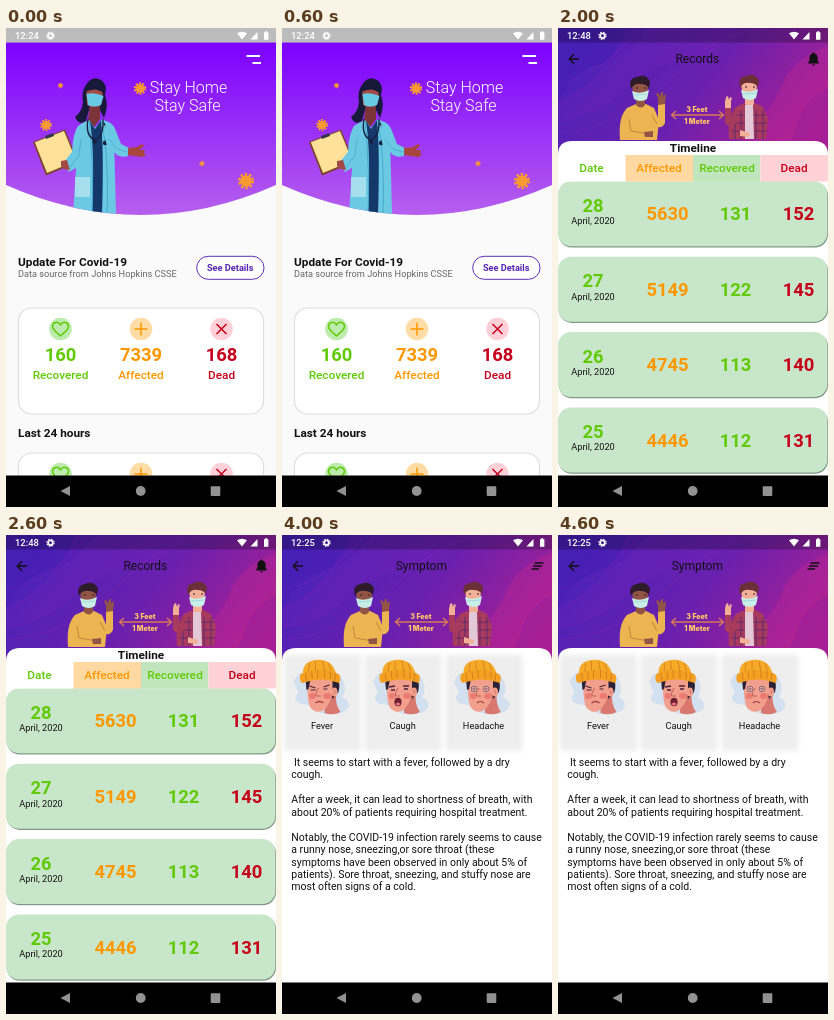
Write an HTML page that moves like this. It is 270 by 479 pixels and loops after 5000 ms.

```html
<!DOCTYPE html>
<html lang="en">
<head>
<meta charset="utf-8">
<style>
html, body { margin: 0; width: 100%; height: 100%; overflow: hidden; background: #fafafa; }
svg { display: block; width: 100vw; height: 100vh; }
text { font-family: Roboto, Inter, sans-serif; white-space: pre; }
</style>
</head>
<body>
<svg id="stage" viewBox="0 0 270 479" xmlns="http://www.w3.org/2000/svg"></svg>
<script>
const GREEN = '#60ca08', ORANGE = '#ff9800', RED = '#c6001c', DARK = '#111';

// Drawing helpers
const path = (d, fill, extra = '') => `<path d="${d}" fill="${fill}" ${extra}/>`;
const line = (d, color, w = 1, extra = '') =>
  `<path d="${d}" fill="none" stroke="${color}" stroke-width="${w}" ${extra}/>`;
const rect = (x, y, w, h, fill, r = 0, extra = '') =>
  `<rect x="${x}" y="${y}" width="${w}" height="${h}" rx="${r}" fill="${fill}" ${extra}/>`;
const dot = (x, y, r, fill, extra = '') => `<circle cx="${x}" cy="${y}" r="${r}" fill="${fill}" ${extra}/>`;
const oval = (x, y, rx, ry, fill) => `<ellipse cx="${x}" cy="${y}" rx="${rx}" ry="${ry}" fill="${fill}"/>`;
const at = (x, y, body, scale = 1) => `<g transform="translate(${x} ${y}) scale(${scale})">${body}</g>`;
const text = (s, x, y, size, o = {}) =>
  `<text x="${x}" y="${y}" font-size="${size}" font-weight="${o.w || 400}" fill="${o.c || DARK}" ` +
  `text-anchor="${o.a || 'start'}" ${o.extra || ''}>${s}</text>`;
const mid = (s, x, y, size, c = DARK, w = 400) => text(s, x, y, size, { c, w, a: 'middle' });

// System chrome
function statusBar(time) {
  const gx = time.length > 4 ? 44.5 : 39;
  return rect(0, 0, 270, 14.5, '#000', 0, 'opacity=".25"') +
    text(time, 9, 11, 9.4, { c: '#fff', w: 500 }) +
    dot(gx, 7.8, 2.3, 'none', 'stroke="#fff" stroke-width="1.7"') +
    dot(gx, 7.8, 3.6, 'none', 'stroke="#fff" stroke-width="1.1" stroke-dasharray="1.6 1.23"') +
    path('M231 5.3Q236 2 241 5.3L236 11.6Z', '#fff') +
    path('M244.5 11.6L251.5 4V11.6Z', '#fff') +
    path('M258 4.2H259.2V3.2H261.2V4.2H262.4V11.8H258Z', '#fff');
}

const navBar = rect(0, 447.5, 270, 32, '#000') +
  path('M54.5 463L64 458V468Z', '#929292') + dot(134.7, 463, 4.9, '#929292') +
  rect(204.7, 458.3, 9.6, 9.6, '#929292', .8);

// Statistics
const icons = {
  heart: line('M0 6.8C-5 2.8-8 .3-8-2.6C-8-7.2-2.3-8 0-4.2C2.3-8 8-7.2 8-2.6C8 .3 5 2.8 0 6.8Z', GREEN, 1.5),
  plus: line('M-6.5 0H6.5M0-6.5V6.5', ORANGE, 1.5),
  cross: line('M-5-5L5 5M5-5L-5 5', RED, 1.5)
};

function stats(y, recovered, affected, dead) {
  const cols = [
    [54.5, '#bdebae', 'heart', recovered, 'Recovered', GREEN],
    [135, '#ffdca6', 'plus', affected, 'Affected', ORANGE],
    [215.5, '#ffd0d7', 'cross', dead, 'Dead', RED]
  ];
  return rect(12.5, y, 245, 106, '#fff', 13, 'stroke="#dedede" stroke-width="1.2"') +
    cols.map(([x, tint, icon, n, label, c]) =>
      at(x, y + 21, dot(0, 0, 11.3, tint) + icons[icon]) +
      mid(n, x, y + 53, 18.4, c, 700) + mid(label, x, y + 71.4, 11.8, c, 500)).join('');
}

const heading = (s, y) => text(s, 12, y, 11.8, { w: 700 });
const button = y => rect(190.7, y, 67.3, 23, '#fff', 11.5, 'stroke="#5b30b5" stroke-width="1"') +
  mid('See Details', 224.2, y + 14.8, 9.2, '#5424b0', 700);
const tile = (x, y, w, h) => rect(x - 3, y - 2, w + 7, h + 6, '#eee', 3, 'filter="url(#soft)"');

// Home banner
const virus = (x, y, r) => at(x, y,
  dot(0, 0, r * .88, 'none', `stroke="#f79a32" stroke-width="${r * .5}" stroke-dasharray="${r * .32} ${r * .233}"`) +
  dot(0, 0, r * .78, '#f79a32'));

const doctor =
  path('M80 57Q86 47 95 52Q102 56 99 67Q103 78 98 90L92 78H84L80 93Q73 98 69 89Q76 84 77 74Q75 63 80 57Z', '#16193a') +
  path('M84 74H94V91L88 99L82 93Z', '#7c3438') +
  path('M80 60Q89 52 97 62L96 75Q89 82 81 77Z', '#a34a45') +
  path('M79 64Q80 50 91 53Q99 56 98 66Q91 58 79 64Z', '#16193a') +
  path('M80.5 66Q89 64 97.5 68L95 77Q88 80 82 77Z', '#68cbe6') +
  path('M72 98Q78 94 83 92L89 100L96 91Q105 94 108 107L110 187H67L70 140Q68 115 72 98Z', '#6cc9e4') +
  path('M84 93L89 101L95 92Q98 120 96 187H86Q89 125 84 93Z', '#14386a') +
  rect(69, 149, 15, 20, '#a6e0ef', 1) +
  line('M83 93Q88 140 86 187M95 92Q103 125 101 187', '#46a9cd', 1) +
  line('M82 91Q79 108 89 112Q98 108 97 91M98 95Q104 104 100 113', '#17213f', 1.4) +
  dot(89, 114, 2, '#17213f') + dot(99, 115, 2.2, '#17213f') +
  path('M99 93Q107 94 110 103L115 116L123 120L122 128Q116 130 111 127L100 115Z', '#6cc9e4') +
  line('M103 111L111 121L121 124', '#46a9cd', .8) +
  path('M122 120L131 119L136 116L138 118L133 122L139 122L138 125L140 127L136 129L122 127Z', '#a8453c') +
  path('M27 114L59 101.5L72 134L40 147.5Z', '#7a4326') +
  path('M28.8 114.3L58 103L70.3 132.8L41 145Z', '#ffe19a') +
  path('M39 108L47 105L48 108L40 111Z', '#34344f') +
  path('M72 98Q67 105 66 124L57 135L63 144Q75 138 78 128L80 108Z', '#6cc9e4') +
  line('M75 111L73 127L64 139', '#46a9cd', .8) +
  path('M55 133L61 132L64 142L58 141L55 138Z', '#a34a45');

const banner = path('M0 14.5H270V157Q135 217 0 157Z', 'url(#home)') +
  `<g clip-path="url(#curve)">${doctor}</g>` +
  virus(134, 60.5, 5.5) + virus(54.5, 57.5, 2.4) + virus(40, 97, 5.2) +
  virus(196, 135.5, 2.4) + virus(240, 153, 7.2) +
  line('M240.5 28H254M246.5 35H255', '#fff', 1.8) +
  mid('Stay Home', 182.5, 65, 16, '#fff', 300) + mid('Stay Safe', 181.5, 82.5, 16, '#fff', 300);

// Symptom portraits, centred on the origin
const moods = {
  fever: line('M-11-1L-5 1M3 0L9-2M-10 3H-5M3 2H7', '#46243a', 1.2) +
    line('M-5 16Q-1 13 3 16', '#a33c42', 1.3),
  cough: line('M-11 0L-5-1M3-1L9-1M-9 3L-5 3M4 2L8 2', '#46243a', 1.3) +
    oval(-2, 15, 3.6, 4.2, '#6e2132') + path('M-4.5 17Q-2 14 .5 17Q-2 20-4.5 17Z', '#ef7780'),
  headache: [-7, 5].map(x => dot(x, 2, 3.8, '#f7c1b0') +
    dot(x, 2, 3, 'none', 'stroke="#704155" stroke-width=".8"') +
    dot(x, 2, 1.2, 'none', 'stroke="#704155" stroke-width=".8"')).join('') +
    line('M-4 16Q-1 13 3 16', '#8e343e', 1.2)
};

const portrait = mood =>
  path('M-27-5Q-23-18-8-15Q14-21 22-8Q27 2 22 10Q33 16 25 24Q9 31-4 24Q-9 17-20 17Q-29 12-22 5Z', '#d3e0f0') +
  path('M4 13L16 5Q14 17 20 25Q13 29 4 26Z', '#d9786e') +
  path('M8-10Q22-10 18 5L12 12Z', '#2b2136') +
  path('M-13-9H12V7Q9 19 2 24Q-6 27-11 19Q-14 9-13-9Z', '#f2a08d') +
  path('M-15-8H-10L-12 2L-14 3Z', '#2b2136') +
  oval(14, 5, 3, 4.5, '#f2a08d') + line('M13 3Q16 4 14 7', '#c8685f', .8) +
  oval(-8, 9, 3.5, 3, '#ea7c74') + oval(7, 9, 4, 3, '#ea7c74') +
  line('M-2 1Q-6 8-4 9H0', '#bd5b57', 1) + moods[mood] +
  path('M-17-10Q-20-25-5-27Q12-29 16-12Z', '#f7a928') +
  line('M-11-24L-12-15M-5-26V-15M2-26L4-15M8-24L11-14', '#d98620', 1) +
  path('M-20-13Q0-21 18-13Q21-11 19-4Q0-11-18-4Q-22-6-20-13Z', '#f4a023') +
  line('M-15-14L-14-6M-9-16L-8-8M-3-17V-9M4-17V-9M10-15V-8M15-14L14-6', '#cf7e1e', .9);

// Prevention pictures, centred on the origin
const badge = (x, y, ok) => dot(x, y, 6.7, '#fff') +
  (ok ? line(`M${x - 2.6} ${y - 2.5}L${x - .3} ${y + 2.6}L${x + 2.6} ${y - 2.8}`, '#18b7ae', 1.3)
      : line(`M${x - 3} ${y - 3}l6 6m0-6l-6 6`, '#e94b55', 1.2));

const foam = [[-15, -8, 6], [-9, -14, 6], [-1, -15, 5], [6, -13, 6], [13, -8, 5], [17, -1, 4], [-19, 0, 3], [10, -1, 7]];
const pictures = {
  wash: foam.map(([x, y, r]) => dot(x, y, r, '#27b5b4')).join('') +
    path('M-25 12Q-17 1-6-6L4-12Q8-11 5-7L-2 0L14-8Q18-7 15-3L4 6L16 1Q19 3 15 7L-3 19Q-15 25-19 19Z', '#f7b59d') +
    path('M-18 1Q-16-9-6-13Q1-13 0-8L-7-1Q-11 9-18 11Z', '#ffc8b1') +
    path('M2 24Q15 21 23 8L20-3Q13 2 10 8L-2 14Z', '#ef9f8a') +
    line('M-2 0L-10 8M4 6L-6 13M15 7L3 13', '#d98473', .8) +
    dot(-11, -8, 3, '#7adbd5') + dot(3, -11, 2.3, '#7adbd5') + dot(12, 2, 3, '#7adbd5'),
  mask: path('M-14 18Q-19-8-10-20Q3-29 13-17Q18-4 18 13Q23 17 17 23H-13Z', '#4a2033') +
    path('M-19 24Q-14 12 0 12Q16 12 21 23Q3 33-19 24Z', '#e7405e') +
    path('M-3 8H7V16Q2 20-3 16Z', '#ee9f8f') +
    path('M-9-10Q2-21 12-8V3Q8 14 1 14Q-8 11-9 0Z', '#ffc1aa') +
    path('M-11-8Q-7-22 4-20Q14-17 13-5Q6-7 3-14Q-1-7-11-8Z', '#4a2033') +
    line('M-6-4L-2-4M5-4L9-4', '#4a2033', 1.2) +
    path('M-9 1Q2-2 12 1Q12 12 2 15Q-8 12-9 1Z', '#27b5b4') + line('M-6 5H9M-5 9H8', '#128e96', .7) +
    path('M-24 17L-23-2Q-25-10-22-11L-20-4L-19-12L-17-4L-15-10L-14 0L-13 16Z', '#27b5b4'),
  sneeze: path('M-20 18Q-24 8-17 0Q-17-20-2-23Q14-23 15-6Q16 2 12 10L8 20H-14Z', '#482034') +
    path('M-25 23Q-20 11-5 12Q12 13 20 21L19 25Q-4 32-25 23Z', '#e7405e') +
    path('M-6 7H5V15Q0 19-6 15Z', '#e78f82') +
    path('M-9-9Q1-19 12-8L13 2Q9 13 1 13Q-8 10-9 0Z', '#ffbca7') +
    path('M-12-4Q-9-21 4-19Q14-16 13-5Q7-7 5-13Q0-5-12-4Z', '#482034') +
    line('M-4-4L0-2M6-2L10-4', '#482034', 1.2) + oval(4, 7, 3, 2.5, '#7a2038') +
    path('M17 25L8 17L5 9Q8 4 11 7L16 10L22 18Z', '#f5a28f') +
    line('M17 3L23-1M18 6L25 5M17 9L23 11', '#5cb8cc', 1.2)
};
const picture = (kind, x, y) => dot(x, y, 27.5, '#fff') + at(x, y, pictures[kind]) +
  badge(x + 20, y - 19.5, kind !== 'sneeze');

// Shared banner of the detail pages
const person = (skin, hair, shirt) =>
  path('M-20 49Q-22 26-13 17L-4 13H6L14 17L19 29L17 49Z', shirt) +
  path('M-4 6H5V14Q1 19-4 14Z', skin) + path('M-8-7Q0-15 8-7L7 6Q1 13-6 7Z', skin) +
  path('M-9-2Q-12-13-3-14Q5-18 10-10L9-3Q6-7 1-7Q-4-8-7-5Z', hair) +
  path('M-8 0Q0 4 9-1L7 8Q1 12-6 8Z', '#c9eeea') + line('M-6 4L7 3', '#8ecfd0', .7) +
  line('M-4-3H-2M4-3H6', '#291b2d', 1.1);

const plaid = [-14, -8, 7, 14].map(x => line(`M${x} 20V49`, '#5c2a68', 1)).join('') +
  line('M-17 25H-4M-18 33H-4M-18 41H-4M4 25H17M4 33H18M4 41H18', '#5c2a68', .9);

function detailTop(title, icon) {
  return rect(0, 0, 270, 135, 'url(#detail)') +
    path('M0 0H90Q65 32 38 37Q15 43 0 72Z', '#3d1ab0', 'opacity=".3"') +
    path('M270 18Q232 31 222 62Q207 94 155 135H270Z', '#c72990', 'opacity=".3"') +
    path('M270 60Q245 72 238 99Q231 119 215 135H270Z', '#8a1c9c', 'opacity=".35"') +
    path('M70 0H180Q160 34 117 34Q88 39 65 64Q37 89 0 94V72Q40 60 70 0Z', '#7b21b9', 'opacity=".22"') +
    line('M0 55Q44 48 82 0M0 105Q66 100 112 51T210 0', '#a72ca8', .6, 'opacity=".35"') +
    at(82, 63, person('#925544', '#2d1b2a', '#edb552') +
      path('M13 20L18 29L18 13L25 12L25 32Q21 40 12 33Z', '#edb552') +
      path('M18 14V7L16 3L18 2L20 5L21 1L23 1V5L26 3L25 13Z', '#925544') +
      line('M-11 28L-9 40L9 43M12 24L17 33', '#bd7937', .8) +
      path('M4 41L13 40L13 46L5 46Z', '#925544')) +
    at(191, 62, person('#f3b096', '#6b2f38', '#a83a5e') + plaid +
      path('M-4 15H4L5 49H-4Z', '#e3c9d8') +
      path('M-13 19L-18 28L-18 17L-24 17L-24 33Q-19 40-12 32Z', '#a83a5e') +
      path('M-18 18V11L-17 8L-19 7L-20 10L-21 6L-23 7L-24 12L-24 18Z', '#f3b096') +
      path('M-9 40L1 43L0 47L-9 46Z', '#f3b096')) +
    line('M114 87H165M118 83L113.5 87L118 91M161 83L165.5 87L161 91', '#d97855', 1.4) +
    ['3 Feet', '1 Meter'].map((s, i) => text(s, 139, 84.3 + i * 11.2, 7,
      { c: '#ffc466', w: 900, a: 'middle', extra: 'style="font-family:Inter,sans-serif"' })).join('') +
    line('M21 31H11.5M16 26.3L11.2 31L16 35.7', DARK, 1.4) +
    mid(title, 139.3, 35, 12) + icon +
    path('M0 448V127Q0 113 14 113H256Q270 113 270 127V448Z', '#fff');
}

const bell = path('M250 34.8L251.4 33V29.4Q251.6 26.2 254.6 25.5V24.6H256.4V25.5Q259.4 26.2 259.6 29.4V33L261 34.8V35.5H250Z', DARK) +
  path('M254 36.3H257Q256.6 37.6 255.5 37.7Q254.4 37.6 254 36.3Z', DARK);
const sort = line('M252.5 28H261.5M251 31H260M249.5 34H257', DARK, 1.3);

const paragraph = rows =>
  rows.map((s, i) => s && text(s, 9.3, 230.9 + i * 12.45, 10.5, { extra: 'xml:space="preserve"' })).join('');

// Pages
const home = banner + heading('Update For Covid-19', 238) +
  text('Data source from Johns Hopkins CSSE', 12, 249.2, 9.2, { c: '#666' }) + button(228.3) +
  stats(280, 160, 7339, 168) + heading('Last 24 hours', 409.3) + stats(425, 9, 497, 7) + statusBar('12:24');

const symptoms = [['fever', 'Fever'], ['cough', 'Caugh'], ['headache', 'Headache']];
const summary = stats(-75, 160, 7339, 168) + heading('Last 24 hours', 54.3) + stats(70, 9, 497, 7) +
  heading('Symptoms', 220) + button(204.5) +
  symptoms.map(([mood, label], i) => {
    const x = [43, 134.5, 226.5][i];
    return tile(x - 30, 237, 60, 68) + at([43, 131, 219][i], 262, portrait(mood)) + mid(label, x, 296.5, 9.2);
  }).join('') +
  heading('Prevention', 345.5) + button(329.7) +
  tile(13, 362, 59, 71) + tile(94, 362, 57, 71) + tile(173, 362, 86, 71) +
  picture('wash', 42.5, 388) + picture('mask', 122, 388) + picture('sneeze', 231, 388) +
  mid('Wash hand', 43, 422, 9.2) + mid('Ware Mask', 121.5, 422, 9.2) +
  mid('Don\'t sneeze in palm', 214.8, 423, 9.2) + statusBar('3:59');

const days = [[28, 5630, 131, 152], [27, 5149, 122, 145], [26, 4745, 113, 140], [25, 4446, 112, 131]];
const centers = [35, 109.5, 177.5, 240.5];
const heads = [['Date', '#fff', GREEN, 33.5], ['Affected', '#ffd8a2', ORANGE, 101],
  ['Recovered', '#c1e5bd', GREEN, 169], ['Dead', '#ffd2d8', RED, 236]];

const records = detailTop('Records', bell) + mid('Timeline', 135, 124.3, 11.8, DARK, 700) +
  days.map(([day, ...counts], i) => {
    const y = 153.3 + i * 75.4;
    return rect(.7, y + 1.2, 269.3, 65, '#809886', 13) + rect(0, y, 269.3, 65, '#c8e6c9', 13) +
      mid(day, centers[0], y + 30.5, 18.4, GREEN, 700) + mid('April, 2020', centers[0], y + 42.8, 9.2) +
      counts.map((n, k) => mid(n, centers[k + 1], y + 39, 18.4, [ORANGE, GREEN, RED][k], 700)).join('');
  }).join('') +
  heads.map(([s, bg, c, x], i) => rect(i * 67.5, 127, 67.5, 26.5, bg) + mid(s, x, 144.3, 11.8, c, 500)).join('') +
  statusBar('12:48');

const prevention = detailTop('Prevention', sort) +
  tile(5, 122, 107, 87) + tile(122, 122, 120, 87) + tile(256, 122, 30, 87) +
  picture('wash', 58, 152) + picture('sneeze', 184, 152) +
  text('Wash Hand Frequently', 12.7, 194, 9.2) + text('Do not sneeze in the palm', 129, 194.7, 9.2) +
  text('Sneeze', 262.5, 194, 9.2) +
  paragraph(['Wash hand with soap or sanitasor frequently.', '', 'Wear Mask and gloves.', '',
    'Keep 1 meter distance with other person', '', 'Do not sneeze in the palm of your hand. Sneeze into',
    'your forearm or elbow', '', 'Do not touch your face with hand']) + statusBar('12:24');

const symptom = detailTop('Symptom', sort) +
  symptoms.map(([mood, label], i) => {
    const x = [40, 120.6, 201.5][i];
    return tile(x - 35, 122, 70, 90) + at([38.5, 118, 199][i], 152, portrait(mood)) + mid(label, x, 194, 9.2);
  }).join('') +
  paragraph([' It seems to start with a fever, followed by a dry', 'cough.', '',
    'After a week, it can lead to shortness of breath, with', 'about 20% of patients requiring hospital treatment.', '',
    'Notably, the COVID-19 infection rarely seems to cause', 'a runny nose, sneezing,or sore throat (these',
    'symptoms have been observed in only about 5% of', 'patients). Sore throat, sneezing, and stuffy nose are',
    'most often signs of a cold.']) + statusBar('12:25');

const defs = `<defs>
  <linearGradient id="home" x1="0" y1="0" x2="0" y2="1">
    <stop offset="0" stop-color="#7c00ff"/><stop offset="1" stop-color="#b65fee"/></linearGradient>
  <linearGradient id="detail" x1="0" y1=".3" x2="1" y2=".7">
    <stop offset="0" stop-color="#4a22b8"/><stop offset=".5" stop-color="#6a20ae"/>
    <stop offset="1" stop-color="#b02090"/></linearGradient>
  <clipPath id="curve"><path d="M0 0H270V157Q135 217 0 157Z"/></clipPath>
  <filter id="soft" x="-20%" y="-20%" width="140%" height="140%">
    <feGaussianBlur stdDeviation="2.5"/></filter>
</defs>`;

const stage = document.getElementById('stage');
stage.innerHTML = defs + rect(0, 0, 270, 479, '#fafafa') +
  [home, summary, records, prevention, symptom].map(p => `<g class="page" display="none">${p}</g>`).join('') + navBar;

const pages = [...stage.querySelectorAll('.page')];
const HOLD = 1000;
let shown = -1;

function show(now) {
  const next = Math.floor(now / HOLD) % pages.length;
  if (next !== shown) {
    pages.forEach((p, i) => p.setAttribute('display', i === next ? 'inline' : 'none'));
    shown = next;
  }
}

const start = performance.now();
function tick() {
  show(performance.now() - start);
  requestAnimationFrame(tick);
}
tick();
</script>
</body>
</html>
```
